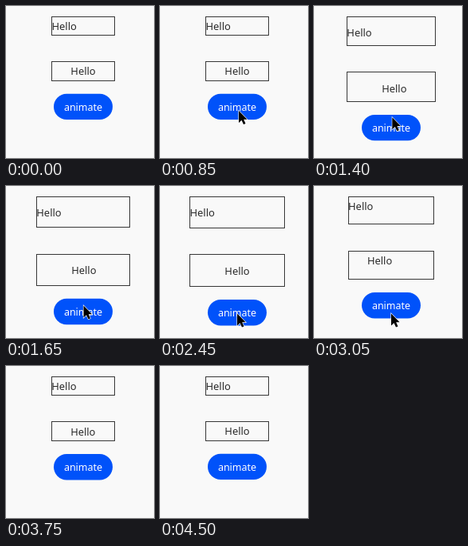
An HTML page with a canvas for the animation above (4.55 s loop, 186 px wide and 190 px high).

```html
<!DOCTYPE html>
<html lang="en">
<head>
<meta charset="utf-8">
<style>
  html, body { margin: 0; height: 100%; overflow: hidden; background: #f9f9f9; }
  canvas { display: block; }
</style>
</head>
<body>
<canvas width="186" height="190"></canvas>
<script>
const ctx = document.querySelector('canvas').getContext('2d');
const LOOP = 4550, GROW = 872, SHRINK = 2850, DURATION = 1045;
const UNIT = 0.81, CENTER = 97, TOP = 12.5;
const SMALL = { w: 80, h: 30 * UNIT };
const LARGE = { w: 120, h: 50 * UNIT };

// time, x, y of the pointer tip
const POINTER = [
  [50, 101, 188], [550, 99, 131], [1200, 99, 131], [1650, 97.5, 149.5],
  [2050, 97, 157.5], [2200, 97, 157.5], [2450, 97, 159.5], [3220, 97, 159.5], [3420, 98, 192],
];
const ARROW = new Path2D('M0 0V15L3.5 11.8L6 17L8.5 15.9L6.2 10.8H10.6Z');

const mix = (a, b, k) => a + (b - a) * k;

// cubic-bezier(.25, .1, .25, 1)
function ease(x) {
  if (x <= 0) return 0;
  if (x >= 1) return 1;
  let lo = 0, hi = 1;
  for (let i = 0; i < 24; i++) {
    const s = (lo + hi) / 2;
    if (0.75 * s * (1 - s) + s ** 3 < x) lo = s; else hi = s;
  }
  return 0.3 * lo * (1 - lo) ** 2 + 3 * (1 - lo) * lo * lo + lo ** 3;
}

function text(string, x, middle, align, color, font = '12.9px') {
  ctx.font = `${font} "Noto Sans", sans-serif`;
  ctx.textAlign = align;
  ctx.fillStyle = color;
  ctx.fillText(string, x, middle + 5);
}

function frame(left, top, w, h) {
  const x = Math.round(left), y = Math.round(top);
  const right = Math.round(left + w - 1), bottom = Math.round(top + h - 1);
  ctx.strokeStyle = '#383838';
  ctx.lineWidth = 1;
  ctx.strokeRect(x + 0.5, y + 0.5, right - x, bottom - y);
}

function button(y) {
  const h = 40 * UNIT;
  ctx.fillStyle = '#0052fa';
  ctx.beginPath();
  ctx.roundRect(CENTER - 37, y, 74, h, h / 2);
  ctx.fill();
  text('animate', CENTER, y + h / 2, 'center', '#fff', '500 12.5px');
}

function pointer(t) {
  const i = POINTER.findIndex(p => p[0] > t);
  if (i < 1) return;
  const [t0, x0, y0] = POINTER[i - 1], [t1, x1, y1] = POINTER[i];
  const k = (t - t0) / (t1 - t0);
  ctx.save();
  ctx.translate(mix(x0, x1, k), mix(y0, y1, k));
  ctx.strokeStyle = '#fff';
  ctx.lineWidth = 1.2;
  ctx.stroke(ARROW);
  ctx.fillStyle = '#000';
  ctx.fill(ARROW);
  ctx.restore();
}

function draw(t) {
  const k = ease((t - GROW) / DURATION) - ease((t - SHRINK) / DURATION);
  const w = mix(SMALL.w, LARGE.w, k), h = mix(SMALL.h, LARGE.h, k);
  // labels take their final layout as soon as the resize begins
  const layout = t >= GROW && t < SHRINK ? LARGE : SMALL;
  const left = CENTER - w / 2, second = TOP + h + 40 * UNIT;

  ctx.fillStyle = '#f9f9f9';
  ctx.fillRect(0, 0, 186, 190);
  frame(left, TOP, w, h);
  text('Hello', left + 0.5, TOP + layout.h / 2, 'left', '#2b2b2b');
  frame(left, second, w, h);
  text('Hello', left + layout.w / 2, second + layout.h / 2, 'center', '#2b2b2b');
  button(second + h + 20 * UNIT);
  pointer(t);
}

const start = performance.now();
function tick() {
  draw((performance.now() - start) % LOOP);
  requestAnimationFrame(tick);
}
tick();
</script>
</body>
</html>
```
